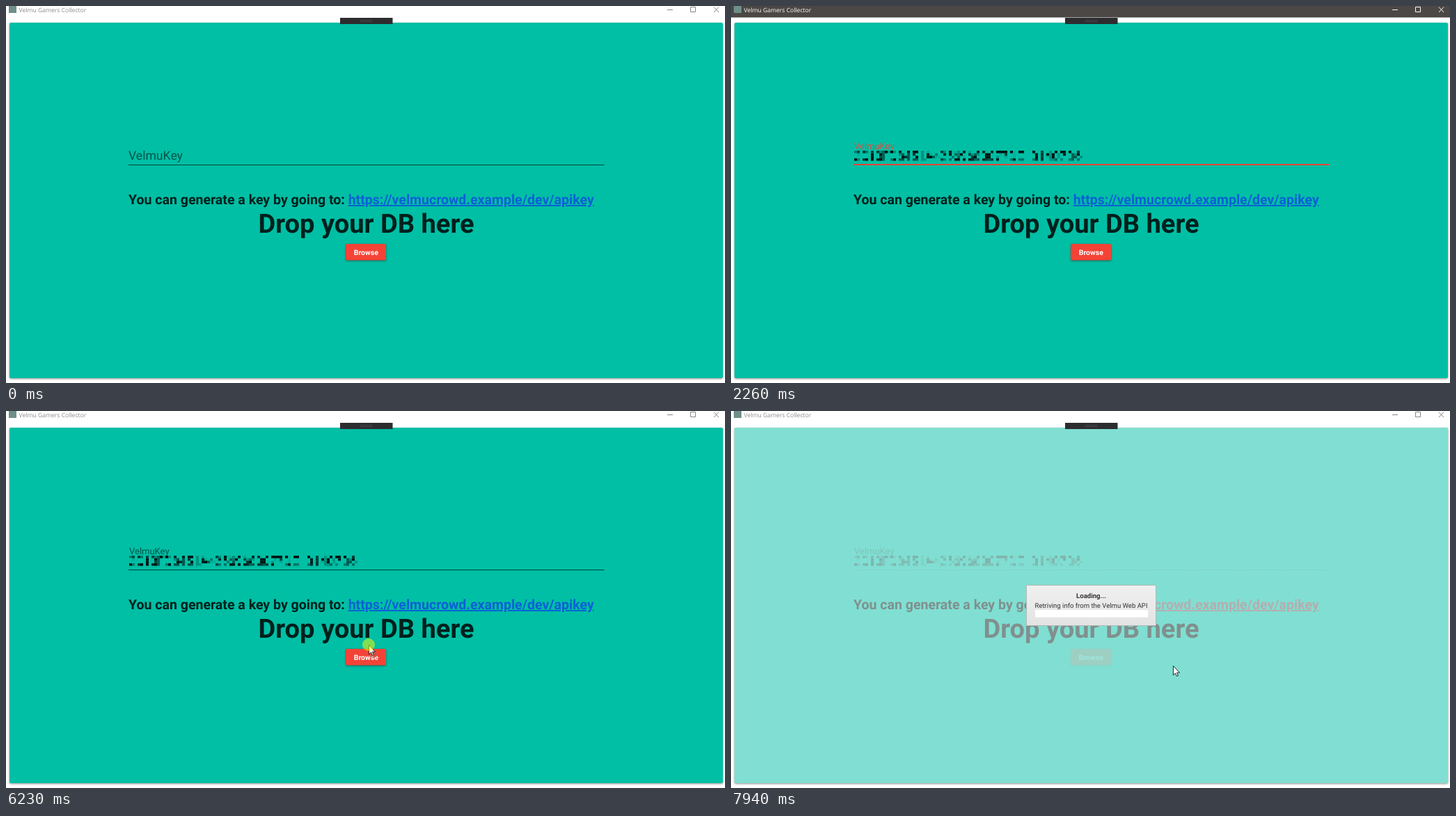
An HTML page that plays this animation: 1033 px wide and 542 px high, repeating every 8 s.

```html
<!DOCTYPE html>
<html lang="en">
<head>
<meta charset="utf-8">
<title>Velmu Gamers Collector</title>
<style>
  html, body { margin: 0; width: 100%; height: 100%; overflow: hidden; background: #fff; }
  svg { display: block; width: 1033px; height: 542px; font-family: Roboto, sans-serif; text-rendering: geometricPrecision; }
  .bold { font-weight: 700; }
  .mid { text-anchor: middle; }
  .card { filter: drop-shadow(0 1px 1.5px rgba(0, 0, 0, .45)); }
</style>
</head>
<body>
<svg viewBox="0 0 1033 542">
  <defs>
    <linearGradient id="grey" x2="0" y2="1">
      <stop stop-color="#f0f0f0"/><stop offset="1" stop-color="#e3e3e3"/>
    </linearGradient>
  </defs>

  <rect id="bar" width="1033" height="16.5"/>
  <rect x="4" width="11" height="10" fill="#6f8f8a"/>
  <text id="title" x="18.5" y="9" font-size="8.6" font-family="Open Sans, Noto Sans, sans-serif">Velmu Gamers Collector</text>
  <path id="buttons" d="M950 5.5h8M983.5 1.5h7v7h-7zM1017 1.5l7 7.5m0-7.5l-7 7.5" fill="none"/>

  <rect class="card" x="5" y="24" width="1025" height="511" rx="2" fill="#00bfa5"/>
  <g id="field">
    <text id="label">VelmuKey</text>
    <g id="key"></g>
    <path id="line" d="M176 228.5H859.5"/>
    <rect id="focus" y="227" height="2" fill="#f44336"/>
    <rect id="caret" y="206" width="1" height="21" fill="#f44336"/>
  </g>
  <text class="bold" x="176" y="285" font-size="19.55" fill-opacity=".83">You can generate a key by going to: <tspan id="link" text-decoration="underline">https://velmucrowd.example/dev/apikey</tspan></text>
  <text class="bold mid" x="517.5" y="326" font-size="38.1" fill-opacity=".83">Drop your DB here</text>
  <g id="browse">
    <rect class="card" x="488" y="342" width="58" height="23.5" rx="2" fill="#f44336"/>
    <text class="bold mid" x="517.3" y="358" font-size="10.5" fill="#fff">Browse</text>
  </g>

  <g id="loading">
    <rect x="5" y="24" width="1025" height="511" rx="2" fill="#fff" fill-opacity=".5"/>
    <rect x="424.5" y="250.5" width="186" height="58" fill="url(#grey)" stroke="#b4b8b7"/>
    <g class="mid" fill="#333">
      <text class="bold" x="517.5" y="269" font-size="9.6">Loading...</text>
      <text x="517.5" y="283" font-size="9.55">Retriving info from the Velmu Web API</text>
    </g>
    <rect x="437" y="286" width="162" height="10.5" fill="#fff"/>
  </g>

  <rect x="480" y="17" width="75.5" height="9" fill="#2d2d30"/>
  <path d="M509 20.5h17M509 22.5h17" stroke="#5a5a5e" stroke-dasharray="1 1"/>

  <g id="cursor">
    <path id="arrow" d="M.4.4V13.8L3.4 11L5.5 15.3L7.5 14.4L5.5 10.2H9.5Z" fill="#fff" stroke="#111" stroke-width=".9"/>
    <path id="beam" d="M-2.5-5.5H2.5M-2.5 5.5H2.5M0-5V5" fill="none" stroke="#d0786e" stroke-width=".8"/>
    <rect id="parcel" x="2.5" y="12.5" width="8" height="5" fill="none" stroke="#8a6f62" stroke-width=".8"/>
    <circle id="press" r="9" fill="#ff0" fill-opacity=".5"/>
  </g>
</svg>

<script>
const LOOP = 8000;
const FOCUS = 1080, PASTE = 1630, BLUR = 2800, DRAG = 5600, DROP = 7170, LOAD = 7320;
const RED = '#f44336';

const el = {};
for (const node of document.querySelectorAll('[id]')) el[node.id] = node;
const set = (id, attrs) => {
  for (const name in attrs) el[id].setAttribute(name, attrs[name]);
};
const show = (id, on) => set(id, { display: on ? 'inline' : 'none' });
const mix = (a, b, p) => a + (b - a) * p;
const within = (t, a, b) => t >= a && t < b;

// Progress 0..1 in n even steps; with lead 1 the first step has already moved.
function steps(t, from, to, n, lead = 1) {
  if (t < from) return 0;
  const k = Math.floor((t - from) / (to - from) * (n - 1) + .01);
  return Math.min(1, (k + lead) / (n - 1 + lead));
}

// Pointer moves: from, to, steps, lead, start, control and end point
const moves = [
  [300, 850, 8, 0, [758, 500], [585, 385], [555, 219]],
  [1940, 2260, 5, 1, [555, 219], [790, 208], [1040, 209]],
  [5600, 6230, 9, 0, [961, 214], [575, 208], [521, 336]],
  [6540, 6780, 4, 1, [521, 336], [596, 350], [671, 364]],
  [7870, 7940, 2, 1, [671, 364], [653, 365], [635, 366]]
];

function pointer(t) {
  const move = moves.filter(m => t >= m[0]).pop();
  if (!move) return [-50, -50];
  const [from, to, n, lead, a, c, b] = move;
  const s = steps(t, from, to, n, lead);
  const p = s * s * (3 - 2 * s);
  return [0, 1].map(i => mix(mix(a[i], c[i], p), mix(c[i], b[i], p), p));
}

// The key is hidden by a mosaic: sample its text once per cell.
function drawKey() {
  const w = 4, h = 3.65;
  const ctx = document.createElement('canvas').getContext('2d');
  ctx.canvas.width = 328;
  ctx.font = '17.6px Roboto, sans-serif';
  ctx.fillText('2C13FD8451A42569680077DE1B14C7D6', 0, 13.5);
  const { data, width } = ctx.getImageData(0, 0, 328, 15);
  let cells = '';
  for (let i = 0; i < 82; i++) {
    for (let j = 0; j < 4; j++) {
      const alpha = data[(Math.floor((j + .5) * h) * width + (i + .5) * w) * 4 + 3] / 255;
      if (alpha > .05) {
        cells += `<rect x="${177 + i * w}" y="${208 + j * h}" width="${w}" height="${h}" fill-opacity="${(alpha * .9).toFixed(2)}"/>`;
      }
    }
  }
  el.key.innerHTML = cells;
}

function draw(t) {
  const active = within(t, FOCUS, BLUR);
  const busy = t >= LOAD;
  const [x, y] = pointer(t);
  const hover = t < DRAG && within(x, 176, 859) && within(y, 193, 229);

  set('bar', { fill: active ? '#4b4846' : '#fff' });
  set('title', { fill: active ? '#fff' : '#8c8c8c' });
  set('buttons', { stroke: active ? '#fff' : '#858585' });

  const rise = steps(t, FOCUS, 1400, 5);
  set('label', {
    x: mix(176, 177, rise), y: mix(221, 206, rise), 'font-size': mix(17.6, 13, rise),
    fill: active ? RED : '#000', 'fill-opacity': active ? .85 : .56
  });
  show('key', t >= PASTE);
  set('field', { opacity: busy ? .5 : 1 });
  set('line', {
    stroke: active || hover ? RED : '#000',
    'stroke-opacity': active || hover ? 1 : .65,
    'stroke-dasharray': busy ? '1 2' : 'none'
  });
  const grow = 683 * (rise - steps(t, BLUR, 3200, 6));
  set('focus', { x: 517.5 - grow / 2, width: grow });
  set('caret', { x: t < PASTE ? 176.5 : 503 });
  show('caret', within(t, FOCUS, 2180));

  set('link', { fill: busy ? '#6b5a60' : '#0b60d6', 'fill-opacity': 1 });
  set('browse', { opacity: busy ? .25 : 1 });
  show('loading', busy);

  const dragging = within(t, DRAG, DROP);
  set('cursor', { transform: `translate(${x} ${y})` });
  show('arrow', !hover);
  show('beam', hover);
  show('parcel', dragging);
  show('press', dragging || within(t, FOCUS, 1160));
}

function frame() {
  draw(performance.now() % LOOP);
  requestAnimationFrame(frame);
}

drawKey();
frame();
</script>
</body>
</html>
```
